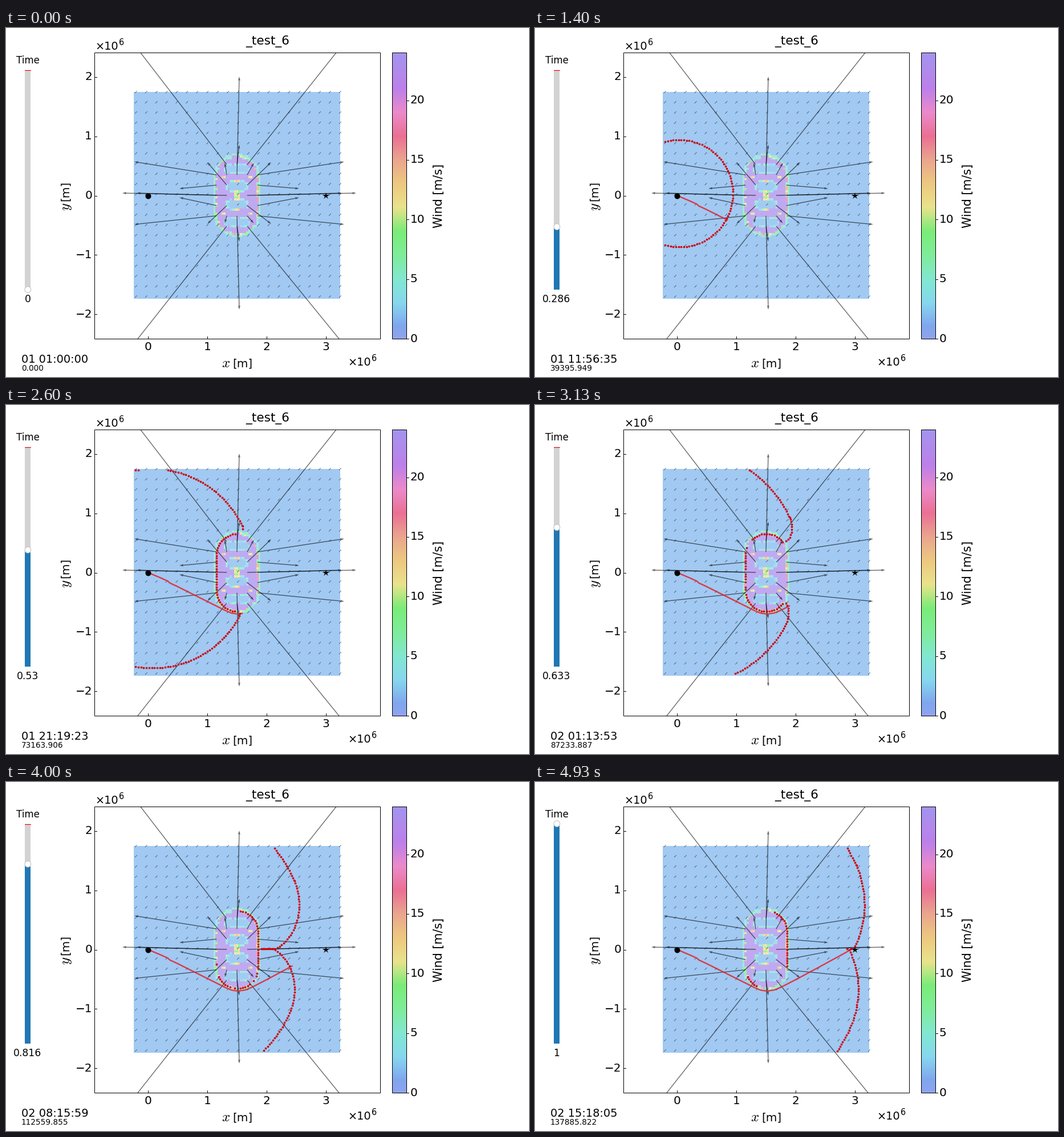
A matplotlib script for the animation above (5.06 s loop, 917 by 611 pixels).

```python
import numpy as np
import matplotlib.pyplot as plt
from matplotlib.animation import FuncAnimation
from matplotlib.colors import LinearSegmentedColormap
from matplotlib.patches import Circle, Rectangle

W, H, DPI = 917, 611, 64
PT = 72 / DPI                       # points per pixel
TICK_MS, LOOP_MS, LAST = 20, 5060, 49
plt.rcParams["font.family"] = "DejaVu Sans"
plt.rcParams["mathtext.fontset"] = "cm"

# Pixel layout of the map
X0, Y0, UNIT = 249.3, 293.5, 103.8
LEFT, RIGHT, TOP, BOTTOM = 155, 656, 43, 544
CX, CY, HALF = 405.3, 293.5, 31.5   # capsule-shaped obstacle
SKIN, ROLL = 36.5, 41
SPEED, DRIFT = 6.70, 0.28
DRAG = {-1: 1.1, 1: 0.97}           # the wind delays the upper turn
TOTAL_SECONDS = 137885.822

WIND_COLORS = [
    (0, "#90a4ee"), (1, "#80a6ee"), (3, "#86d8ee"), (5, "#82e8d0"), (7, "#80ec9a"),
    (9, "#7aec78"), (11, "#e9e38c"), (13, "#edc980"), (15, "#eba68e"),
    (17, "#ea7094"), (19, "#ec8aca"), (21, "#bd80ea"), (24, "#a494ef")]
wind_cmap = LinearSegmentedColormap.from_list(
    "wind", [(v / 24, c) for v, c in WIND_COLORS], N=512)

fig = plt.figure(figsize=(W / DPI, H / DPI), dpi=DPI, facecolor="white")
ax = fig.add_axes([0, 0, 1, 1])
ax.axis("off")


def label(x, y, text, size=20, ha="center", va="baseline", **kw):
    return ax.text(x, y, text, fontsize=size * PT, ha=ha, va=va, **kw)


def line(xs, ys, color="black", width=1.0, **kw):
    return ax.plot(xs, ys, color=color, lw=width * PT, **kw)[0]


def power_of_ten(x, y):
    label(x, y, "×10", 19.3, ha="left")
    label(x + 42, y - 8, "6", 14.5, ha="left")


def capsule(across, along_axis, half, radius):
    """Signed distance to a capsule lying along one axis."""
    return np.hypot(across, np.maximum(along_axis - half, 0)) - radius


def wind_speed():
    rng = np.random.default_rng(6)
    n = 101
    xs = 224 + (np.arange(n) + 0.5) * 362 / n
    ys = 112 + (np.arange(n) + 0.5) * 362 / n
    dx, dy = np.meshgrid(abs(xs - 405), abs(ys - 293))
    edge = capsule(dx, dy, HALF, 38)
    lens = np.minimum(capsule(dy - 16, dx, 10, 8), capsule(dy - 47, dx, 14, 8))
    cool = rng.choice([3.5, 4, 5, 5, 6, 8], (n, n))
    pale = rng.choice([2.5, 3, 4, 4, 5, 23.2], (n, n))
    warm = rng.choice([10.5, 11, 11, 12, 14], (n, n))
    mixed = rng.choice([4, 5, 7, 11, 15, 18, 23, 23, 23, 23], (n, n))
    core = rng.choice([5, 8, 11, 11, 12], (n, n))
    return np.select(
        [(dx < 7) & (dy < 8),
         (dx < 6) & (abs(dy - 25) < 2),
         (abs(dx - 24) < 3.6) & (abs(dy - 32.5) < 3),
         lens < -1.9,
         lens < 1.7,
         (edge > -0.6) & (edge < 2.9),
         (edge > -3.4) & (edge <= -0.6),
         edge <= -3.4],
        [core, warm, warm, 1.9, pale, cool, mixed, 23.2], 1.75)


def arrows(rows, width, **head):
    quiver = ax.quiver(*np.array(rows).T, angles="xy", scale_units="xy", scale=1,
                       units="dots", width=width, color="black", alpha=0.6,
                       zorder=3, **head)
    quiver.set_clip_path(Rectangle((LEFT, TOP), RIGHT - LEFT, BOTTOM - TOP,
                                   transform=ax.transData))


def draw_arrows():
    # Outward push by (column, row) distance from the centre, plus a steady wind.
    push = {(0, 2): (0, 168), (0, 3): (0, 31), (2, 2): (148, 19), (2, 1): (69, -10),
            (1, 0): (187, 0), (2, 0): (144, 0), (1, 3): (257, 324),
            (1, 2): (7.5, 17), (1, 1): (38, 36)}
    strong, breeze = [], []
    for j in range(-10, 11):
        for i in range(-10, 11):
            cell = abs(i), abs(j)
            px, py = push.get(cell, (0, 0))
            (strong if cell in push else breeze).append(
                (405 + 17.9 * i, 293 + 17.9 * j,
                 np.sign(i) * px + 4, np.sign(j) * py - 4))
    arrows(strong, 1.35)
    arrows(breeze, 0.8, headwidth=1.6, headlength=2, headaxislength=2)


def draw_map():
    ax.imshow(wind_speed(), cmap=wind_cmap, vmin=0, vmax=24, alpha=0.75, aspect="auto",
              interpolation="nearest", extent=(224, 586, 474, 112), zorder=1)
    ax.imshow(np.linspace(24, 0, 501)[:, None], cmap=wind_cmap, vmin=0, vmax=24,
              aspect="auto", extent=(677, 702, BOTTOM, TOP), zorder=1)
    ax.set(xlim=(0, W), ylim=(H, 0))
    draw_arrows()
    for x, width in ((LEFT, RIGHT - LEFT), (677, 25)):
        ax.add_patch(Rectangle((x, TOP), width, BOTTOM - TOP, fill=False,
                               lw=PT, ec="black", zorder=8))

    for v in range(4):
        x = X0 + UNIT * v
        line([x, x], [BOTTOM, BOTTOM - 4])
        label(x, 558, str(v), va="center")
    for v in range(-2, 3):
        y = Y0 - UNIT * v
        line([LEFT, LEFT + 4], [y, y])
        label(151, y, str(v).replace("-", "−"), ha="right", va="center")
    for v in range(0, 25, 5):
        y = BOTTOM - (BOTTOM - TOP) * v / 24
        line([702, 706], [y, y])
        label(709, y, str(v), ha="left", va="center")

    label(458.5, 29, "_test_6", 21.6)
    power_of_ten(156, 38)
    power_of_ten(599, 591)
    label(386, 594, "$x$", 25)
    label(397, 594, "[m]", ha="left")
    label(106, 313, "$y$", 25, va="center", rotation=90)
    label(104, 285, "[m]", va="center", rotation=90)
    label(759, 294, "Wind [m/s]", 20.6, va="center", rotation=90)
    line([X0], [Y0], marker="o", ms=10 * PT, mew=0, zorder=7)
    line([561], [Y0], marker="*", ms=12.5 * PT, mew=0, zorder=7)


def along(path, distances):
    run = np.r_[0, np.cumsum(np.hypot(*np.diff(path, axis=0).T))]
    return np.column_stack([np.interp(distances, run, path[:, c]) for c in (0, 1)])


def length(path):
    return np.hypot(*np.diff(path, axis=0).T).sum()


def front(step, side):
    """Half of the wavefront: a circle, then an involute around the obstacle."""
    sx, sy, r = X0 + DRIFT * step, Y0 - DRIFT * step, SPEED * step
    dx, dy = CX - sx, HALF + side * (CY - sy)
    dist = np.hypot(dx, dy)
    reach = np.sqrt(dist**2 - ROLL**2)
    tangent = np.arctan2(dy, dx) + np.arcsin(ROLL / dist)

    angle = np.linspace(np.pi, tangent if r > reach else 0, 240)
    path = np.column_stack([sx + r * np.cos(angle), sy + side * r * np.sin(angle)])
    if r > reach:
        pace = DRAG[side] * ROLL
        turn = np.linspace(0, min((r - reach) / pace, tangent + np.pi / 2), 160)
        heading, rest = tangent - turn, r - reach - pace * turn
        x = CX - ROLL * np.sin(heading) + rest * np.cos(heading)
        out = HALF + ROLL * np.cos(heading) + rest * np.sin(heading)
        kept = out > -11            # the two halves meet on the midline
        wrapped = np.column_stack([x, CY - 2 + side * np.maximum(out, 0)])
        path = np.vstack([path, wrapped[kept]])
    dots = along(path, np.arange(0, length(path), 4.7))
    x, y = dots.T
    outside = capsule(x - CX, abs(y - CY), HALF, SKIN) > 0
    inside_map = (x > 226) & (x < 584) & (y > 113.5) & (y < 472)
    return dots[outside & inside_map]


def skin_dots():
    """Dots caught on the obstacle, with the step at which each one vanishes."""
    s = np.arange(-177, 178, 4.6)
    h = abs(s)
    a = np.clip((h - HALF) / SKIN, 0, np.pi)
    dy = SKIN * np.sin(a) + np.minimum(h, HALF) - np.maximum(h - HALF - np.pi * SKIN, 0)
    points = np.column_stack([CX - SKIN * np.cos(a), CY - np.sign(s) * dy])
    rng = np.random.default_rng(3)
    vanish = np.select(
        [h < 45, (s > 0) & (s < 89), s >= 89, (s > -146) & (s < -72)],
        [rng.uniform(27, 41, s.size), 27 + (s - 40) / 5, s - 53,
         rng.uniform(37, 45, s.size)], 99)
    return points, h, vanish


def caught(step):
    points, h, vanish = SKIN_DOTS
    direct = np.hypot(*(points - (X0 + DRIFT * step, Y0 - DRIFT * step)).T)
    reach = np.where(h < 70, direct, 85 + h)
    return points[(reach < SPEED * step) & (step < vanish)]


def slider_text(value):
    digits = next(d for d in range(4) if abs(value - round(value, d)) < 1e-3)
    return f"{value:.{digits}f}"


def clock_text(seconds):
    total = int(seconds) + 3600
    day, rest = divmod(total, 86400)
    return f"{day + 1:02d} {rest // 3600:02d}:{rest // 60 % 60:02d}:{rest % 60:02d}"


ROUTE = np.array([
    (249.5, 293.5), (272, 303), (284, 308.5), (287, 311.5), (300, 317.5),
    (360, 347.5), (386, 360.5), (396, 364.5), (407, 366), (420, 364),
    (432, 359), (460, 344.5), (500, 323), (545, 298.5), (556, 291.5)])
ROUTE_LENGTH = length(ROUTE)
SKIN_DOTS = skin_dots()

draw_map()
route = line([], [], "#e6202a", 2.4, alpha=0.85, zorder=5)
dots = line([], [], "#d00008", 0, marker="o", ms=3.7 * PT, mew=0, zorder=6)

label(38, 62, "Time", 16.6)
ax.add_patch(Rectangle((33, 73), 10, 385, fc="lightgrey", lw=0))
line([33, 43], [73.5, 73.5], "red")
fill = ax.add_patch(Rectangle((33, 458), 10, 0, fc="#1f77b4", lw=0, zorder=4))
handle = ax.add_patch(Circle((38.3, 458), 5.4, fc="white", ec="0.75", lw=PT, zorder=5))
value_label = label(38, 479.5, "", 17.3)
clock_label = label(27, 586, "", 19.4, ha="left")
seconds_label = label(27, 600, "", 13.6, ha="left")


def update(tick):
    t = tick * TICK_MS + TICK_MS // 2
    # Steps alternate between 130 ms and 70 ms.
    step = min(2 * (t // 200) + (t % 200 >= 130), LAST)
    value = step / LAST
    seconds = TOTAL_SECONDS * value

    route.set_data(*along(ROUTE, np.linspace(0, ROUTE_LENGTH * value, 120)).T)
    if step:
        dots.set_data(*np.vstack([front(step, -1), front(step, 1), caught(step)]).T)
    else:
        dots.set_data([], [])

    y = 458 - 385 * value
    fill.set_y(y)
    fill.set_height(458 - y)
    handle.center = (38.3, y)
    value_label.set_text(slider_text(value))
    clock_label.set_text(clock_text(seconds))
    seconds_label.set_text(f"{seconds:.3f}")
    return route, dots, fill, handle, value_label, clock_label, seconds_label


animation = FuncAnimation(fig, update, frames=LOOP_MS // TICK_MS, interval=TICK_MS,
                          repeat=True, repeat_delay=0)
plt.show()
```
